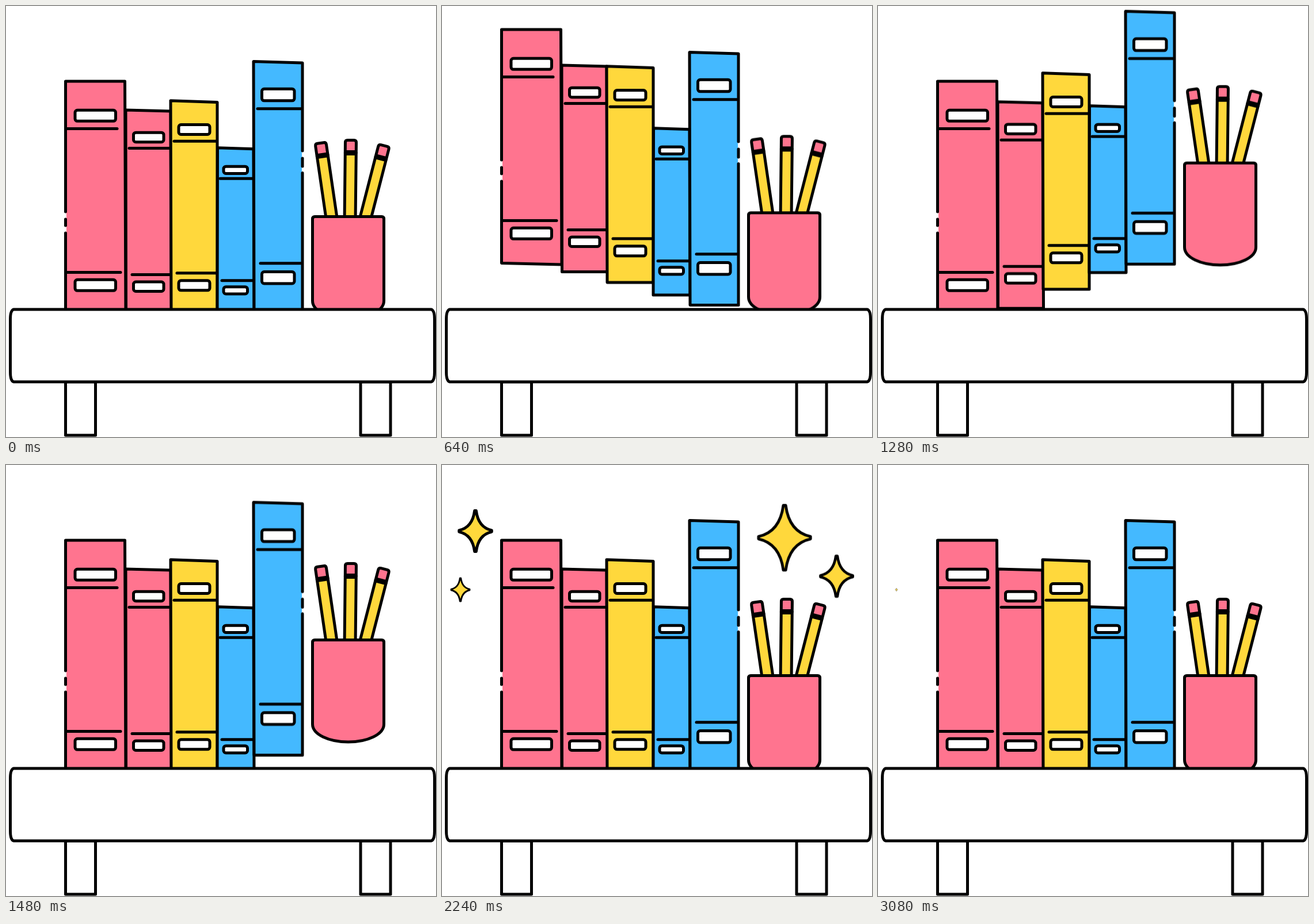
An HTML page that plays this animation: 747x750 px, repeating every 3120 ms.

```html
<!DOCTYPE html>
<html lang="en">
<head>
<meta charset="utf-8">
<title>Bookshelf</title>
<style>
  html, body { margin: 0; width: 100%; height: 100%; overflow: hidden; background: #fff; }
  svg { display: block; width: 747px; height: 750px; }
</style>
</head>
<body>
<svg id="stage" viewBox="0 0 747 750" fill="none" stroke="#000" stroke-width="5"
     stroke-linecap="round" stroke-linejoin="round"></svg>
<script>
const LOOP = 3120, STEP = 40, LIFT = 94;
const PINK = '#ff748f', YELLOW = '#ffd83c', BLUE = '#44b9ff';
const stage = document.getElementById('stage');

function add(parent, tag, attrs = {}) {
  const el = document.createElementNS('http://www.w3.org/2000/svg', tag);
  for (const k in attrs) el.setAttribute(k, attrs[k]);
  parent.append(el);
  return el;
}
const path = (parent, d, attrs) => add(parent, 'path', { d, ...attrs });

// fill: closed shape; edge: visible outline; labels: [x, w, h, y1, y2]; bands: [x1, x2, y]
const books = [
  { color: PINK, start: 0,
    fill: 'M105 131H206.5L208 540L105 537.5Z',
    edge: 'M103.5 358V131H206.5L208 540L103.5 537.5V395M103.5 371V382',
    labels: [120, 70.5, 19, 181.3, 476.3],
    bands: [[106, 193, 213.5], [106, 199, 463.5]] },
  { color: PINK, start: 120,
    fill: 'M208 181L286 183L287.5 540.5H208.5Z',
    labels: [221.5, 52.5, 16.5, 220.2, 480],
    bands: [[214, 284, 247.5], [219, 285, 467.5]] },
  { color: YELLOW, start: 200,
    fill: 'M286 164.8L367 167.5V541H287Z',
    labels: [300, 54, 17, 206.5, 477.8],
    bands: [[292, 365, 235.3], [297, 365, 464.8]] },
  { color: BLUE, start: 280,
    fill: 'M367.5 246.8L430 248.7L431 537H367Z',
    labels: [378, 41.5, 12.2, 279.2, 488.7],
    bands: [[372, 429, 300.2], [375, 429, 477.8]] },
  { color: BLUE, start: 360,
    fill: 'M430 96.5L514 99V536.5H431Z',
    edge: 'M515 252V99L430 96.5L431 536.5H515V290.5M515 265V279',
    labels: [444.5, 56.5, 20.5, 144.3, 462.5],
    bands: [[437, 513, 178.8], [442, 513, 447.8]] },
];

function drawBook(b) {
  const g = add(stage, 'g');
  path(g, b.fill, { fill: b.color, stroke: 'none' });
  path(g, b.edge || b.fill);
  const [x, width, height, ...ys] = b.labels;
  for (const y of ys) add(g, 'rect', { x, y, width, height, rx: 4, fill: '#fff' });
  for (const [x1, x2, y] of b.bands) path(g, `M${x1} ${y}H${x2}`);
  return g;
}

function drawCup() {
  const g = add(stage, 'g');
  for (const [x, y, turn] of [[546.5, 238.5, -8.3], [599, 233.5, 0.6], [656.8, 243, 14.4]]) {
    const p = add(g, 'g', { transform: `translate(${x} ${y}) rotate(${turn})` });
    path(p, 'M-9.5 22V145H9.5V22Z', { fill: YELLOW });
    path(p, 'M-9.5 22V4Q-9.5 0 -5.5 0H5.5Q9.5 0 9.5 4V22Z', { fill: PINK });
    path(p, 'M-9.5 22H9.5', { 'stroke-width': 9, 'stroke-linecap': 'butt' });
  }
  path(g, 'M536.5 366.5H652.5Q656.5 366.5 656.5 370.5V513C656.5 531 628 544 594.5 544' +
          'S532.5 531 532.5 513V370.5Q532.5 366.5 536.5 366.5Z', { fill: PINK });
  return g;
}

function lift(el, start) {
  const at = y => `translateY(${-y}px)`;
  const anim = el.animate([
    { transform: at(0), easing: 'cubic-bezier(.65,0,.35,1)' },
    { transform: at(LIFT), offset: 2 / 3, easing: 'cubic-bezier(.6,0,.78,.73)' },
    { transform: at(0) },
  ], { duration: 1200, delay: start, fill: 'both' });
  anim.pause();
  return anim;
}

const lifts = books.map(b => lift(drawBook(b), b.start));
lifts.push(lift(drawCup(), 440));

// shelf
for (const x of [103.5, 616])
  add(stage, 'rect', { x, y: 654, width: 52, height: 93, fill: '#fff' });
path(stage, 'M13 528H739Q744.5 530 744.5 545V637Q744.5 652 739 654H13' +
            'Q7.5 652 7.5 637V545Q7.5 530 13 528Z', { fill: '#fff' });

// stars: centre, half height, start
const stars = [
  [58, 115, 38, 1705], [595, 126.5, 61, 1810],
  [685.5, 193.5, 40.5, 1850], [32, 217, 38, 2050],
].map(([x, y, size, start]) => {
  const h = size - 2.5, w = size * 0.81 - 2.5, t = size * 0.035;
  const cx = w * 0.18, cy = h * 0.18;
  const el = path(stage,
    `M${t} ${-h}Q${cx} ${-cy} ${w} ${-t}V${t}Q${cx} ${cy} ${t} ${h}` +
    `H${-t}Q${-cx} ${cy} ${-w} ${t}V${-t}Q${-cx} ${-cy} ${-t} ${-h}Z`, { fill: YELLOW });
  return { el, x, y, start };
});

function show(time) {
  for (const a of lifts) a.currentTime = time;
  for (const { el, x, y, start } of stars) {
    const u = (time - start) / 1050;
    const on = u > 0 && u < 1;
    el.setAttribute('visibility', on ? 'visible' : 'hidden');
    if (on) el.setAttribute('transform',
      `translate(${x} ${y}) scale(${Math.sin(Math.PI * u) ** 0.92})`);
  }
}

const begin = performance.now();
function tick() {
  const t = (performance.now() - begin) % LOOP;
  show(Math.floor(t / STEP) * STEP);
  requestAnimationFrame(tick);
}
tick();
</script>
</body>
</html>
```
